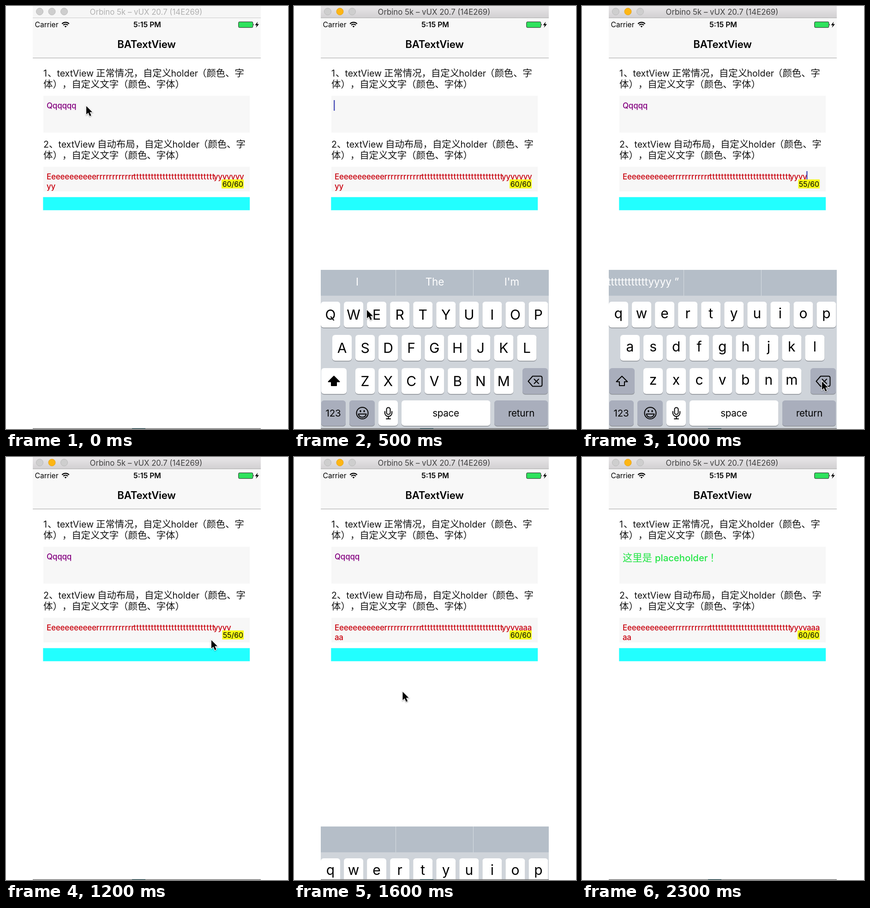
These frames come from a looping animation (611x917 px, 2.4 s). An HTML page:

```html
<!DOCTYPE html>
<html lang="zh-CN">
<head>
<meta charset="utf-8">
<title>BATextView</title>
<style>
  html, body { margin: 0; width: 100%; height: 100%; overflow: hidden; background: #fff; }
  svg { display: block; width: 611px; height: 917px; }
  text { font-family: Inter, "Liberation Sans", sans-serif; white-space: pre; text-spacing-trim: space-all; }
  .mid { text-anchor: middle; }
  .end { text-anchor: end; }
  .cjk { font-family: "Noto Sans CJK SC", "Noto Sans CJK JP", "Noto Sans CJK", sans-serif; font-size: 20.4px; letter-spacing: 0; }
  .label { font-size: 19.5px; fill: #111; }
  .field { font-size: 17px; font-weight: 500; letter-spacing: -.2px; }
  .red { fill: #c8000d; }
  .hint { font-size: 20.3px; font-weight: 500; fill: #22e545; }
  .hint .cjk { font-size: 21.3px; }
  .dot { fill: #cecece; stroke: #bababa; }
  .key { fill: #fff; }
  .fn { fill: #a9aebc; }
  .cap { font-size: 30px; }
  .word { font-size: 20.5px; letter-spacing: -.2px; }
  .sug { font-size: 22.4px; fill: #fff; }
  .line { fill: none; stroke: #000; stroke-width: 2; stroke-linecap: round; stroke-linejoin: round; }
  #pointer { filter: drop-shadow(0 1px 1px #0006); }
</style>
</head>
<body>
<svg viewBox="0 0 611 917">
  <defs>
    <linearGradient id="chrome" x2="0" y2="1">
      <stop stop-color="#e8e6e8"/><stop offset="1" stop-color="#d2d0d2"/>
    </linearGradient>
    <clipPath id="screen"><rect x="58" width="494" height="917"/></clipPath>
  </defs>
  <g clip-path="url(#screen)">
    <rect id="bar" x="58" width="494" height="26"/>
    <rect id="barLine" x="58" y="25" width="494" height="1.5"/>
    <circle class="dot" cx="73" cy="12" r="7.5"/>
    <circle class="dot" id="amber" cx="99.5" cy="12" r="7.5"/>
    <circle class="dot" cx="126" cy="12" r="7.5"/>
    <text id="title" class="mid" x="303.5" y="18.5" font-size="16.8">Orbino 5k – vUX 20.7 (14E269)</text>

    <rect x="58" y="26.5" width="494" height="86" fill="#f8f8f8"/>
    <rect x="58" y="112" width="494" height="1.3" fill="#b4b4b4"/>
    <text x="62.5" y="46" font-size="15.6">Carrier</text>
    <g fill="none" stroke="#000" stroke-width="2.2">
      <path d="M121.3 38.6a11 11 0 0 1 15.4 0M124 41.6a7 7 0 0 1 10 0"/>
      <path d="M126.6 44a3.6 3.6 0 0 1 4.8 0L129 46.4Z" fill="#000" stroke="none"/>
    </g>
    <text class="mid" x="306" y="46" font-size="15.8" font-weight="600">5:15 PM</text>
    <rect x="503.8" y="34.3" width="31" height="12.4" rx="2" fill="#2fe25d" stroke="#222"/>
    <path d="M536 38.5q2 2 0 4Z"/>
    <path d="M545.5 34L539.5 41.5H543.3L541.5 47L548 39.3H544Z"/>
    <text class="mid" x="304.5" y="91" font-size="22.2" font-weight="600" letter-spacing="-.2">BATextView</text>

    <g id="labels"></g>
    <rect x="81" y="194.5" width="447" height="80" fill="#f7f7f7"/>
    <rect x="81" y="348.5" width="447" height="53.5" fill="#f7f7f7"/>
    <rect x="80.5" y="414.5" width="447.5" height="28" fill="#22ffff" stroke="#22ffff" stroke-opacity=".4"/>

    <rect id="mark" x="88" y="204" width="55" height="22.5" fill="#f8c5cb"/>
    <text id="first" class="field" x="88" y="222" fill="#83007f"></text>
    <text id="hint" class="hint" y="225.5"><tspan class="cjk" x="88">这里是</tspan><tspan x="158">placeholder</tspan><tspan class="cjk" x="277">！</tspan></text>
    <g id="second"></g>
    <rect id="caret" width="2.4" height="23" fill="#4b50b8"/>
    <rect id="badge" y="376" height="19.5" fill="#f6fa14"/>
    <text id="count" class="end" x="514" y="391.5" font-size="16" letter-spacing="-.1"></text>

    <g id="popover">
      <path d="M77 133H174q9 0 9 9V172q0 9-9 9H128L115 193L102 181H77q-9 0-9-9V142q0-9 9-9Z" fill="#1e1e1e"/>
      <text class="mid" x="125.5" y="163" font-size="17.8" fill="#fff">Qqqqqq</text>
    </g>

    <g id="board">
      <rect x="58" y="572" width="494" height="345" fill="#cfd4da"/>
      <rect x="58" y="572" width="494" height="56" fill="#b5bec8"/>
      <path d="M220.5 572V628M388.5 572V628" stroke="#d6dbe1"/>
    </g>

    <rect x="58" y="915.5" width="494" height="1.5" fill="#777"/>
    <rect x="273" y="915.5" width="29" height="1.5" fill="#2c4a50"/>
    <path id="pointer" d="M0 0V18L4.2 14.2L7.4 21.6L10.6 20.2L7.4 13H13Z" stroke="#fff" stroke-width="2.2" paint-order="stroke"/>
  </g>
</svg>
<script>
const $ = id => document.getElementById(id);

function add(parent, tag, attrs, text = '') {
  const el = document.createElementNS('http://www.w3.org/2000/svg', tag);
  for (const k in attrs) el.setAttribute(k, attrs[k]);
  el.textContent = text;
  return parent.appendChild(el);
}
const set = (id, attrs) => { for (const k in attrs) $(id).setAttribute(k, attrs[k]); };
const show = (id, on) => { $(id).style.display = on ? '' : 'none'; };

// Field descriptions: mixed Latin and Chinese runs
function label(y, num, lead, dx) {
  const top = add($('labels'), 'text', { class: 'label', y });
  const run = (x, s, cls = '') => add(top, 'tspan', { x, class: cls }, s);
  run(81, num);
  run(90 + dx, '、', 'cjk');
  run(110.5 + dx, 'textView');
  run(195 + dx, lead + '，自定义', 'cjk');
  run(357.5 + dx, 'holder');
  run(414 + dx, '（颜色、字', 'cjk');
  add($('labels'), 'text', { class: 'cjk', x: 81, y: y + 24, fill: '#111' }, '体），自定义文字（颜色、字体）');
}
label(153, '1', '正常情况', 0);
label(307, '2', '自动布局', 3);

// Second field: a fixed start and an editable tail
const redRun = (x, y, gap, s = '') =>
  add($('second'), 'text', { class: 'field red', x, y, style: `letter-spacing:${gap}px` }, s);
const head = ['E', 'e'.repeat(10), 'r'.repeat(12), 't'.repeat(28)];
redRun(88, 376, 0, head[0]);
redRun(98, 376, -.2, head[1]);
redRun(195.5, 376, .1, head[2]);
redRun(276, 376, .6, head[3]);
const tailY = redRun(450, 376, -.45);
const tailA = redRun(487, 376, -.3);
const tailWrap = redRun(88, 397, -.4);

// Keyboard
const board = $('board');
function key(x, y, w, h, cls = 'key') {
  add(board, 'rect', { x, y: y + 1.6, width: w, height: h, rx: 6, fill: '#8d9197' });
  return add(board, 'rect', { x, y, width: w, height: h, rx: 6, class: cls });
}
const letters = [];
[['qwertyuiop', 79, 641], ['asdfghjkl', 104, 713], ['zxcvbnm', 154, 785]].forEach(([row, x, y]) => {
  [...row].forEach((ch, i) => {
    const cx = x + i * 50.05;
    key(cx - 21, y, 42, 56);
    letters.push({ ch, y, el: add(board, 'text', { class: 'cap mid', x: cx }) });
  });
});
const shiftKey = key(59, 785, 55, 56);
key(495, 785, 55, 56, 'fn');
key(59, 855, 53, 55, 'fn');
key(120, 855, 55, 55, 'fn');
key(183, 855, 42, 55);
key(233, 855, 192.5, 55);
key(434, 855, 116, 55, 'fn');
[['123', 85], ['space', 329], ['return', 492.5]].forEach(([s, x]) =>
  add(board, 'text', { class: 'word mid', x, y: 889.5 }, s));

const icon = d => add(board, 'path', { class: 'line', d });
const shiftIcon = icon('M86.5 802.5L98.5 814.5H92V823H81V814.5H74.5Z');
icon('M517 802.5H534q3.5 0 3.5 3.5V821q0 3.5-3.5 3.5H517L507.5 813.5ZM520.5 809L530 818.5M530 809L520.5 818.5');
icon('M135.5 882.5a12.5 12.5 0 1 0 25 0a12.5 12.5 0 1 0-25 0M139.5 884.5H156.5Q155 891.5 148 891.5T139.5 884.5Z');
icon('M144 877.5V879M152 877.5V879').style.strokeWidth = 3;
icon('M200.5 874.5a4 4 0 0 1 8 0V881.5a4 4 0 0 1-8 0ZM196.8 879V882a7.7 7.7 0 0 0 15.4 0V879M204.5 890V895M200 895H209');

const slotX = [137, 305, 472];
const slots = slotX.map(x => add(board, 'text', { class: 'sug mid', x, y: 606 }));

// Each entry changes only what differs from the one before; one entry per 100 ms
const HIDDEN = 345, STARTERS = ['I', 'The', "I'm"];
const changes = [
  { active: false, drop: HIDDEN, upper: false, q: 6, tail: 'yyyyyyyyy', words: [], caret: 0, pop: false, at: [174, 217] },
  { active: true, drop: 0, caret: 1, words: ['“Qqqqqq”'] },
  { at: [520, 814] },
  { q: 3, words: ['“Qqq”'] },
  { q: 0, upper: true, words: STARTERS, at: [440, 775] },
  { at: [158, 659] },
  { q: 2, upper: false, words: ['“Qq”'], at: [78, 668] },
  { q: 5, words: ['“Qqqqq”', 'Qqqqqq'] },
  { caret: 2, words: [], at: [440, 385] },
  { tail: 'yyyyyyy', at: [520, 814], words: ['tail'] },
  { tail: 'yyyy' },
  { drop: 200, caret: 0, words: [], at: [480, 560] },
  { drop: HIDDEN, at: [445, 397] },
  { drop: 0, caret: 2 },
  { tail: 'yyyya', words: ['tail'], at: [104, 740] },
  { tail: 'yyyyaaaaa', words: [] },
  { drop: 229, caret: 0, at: [235.5, 509] },
  { drop: HIDDEN, at: [160, 225] },
  { drop: 0, caret: 1, words: ['“Qqqqq”', 'Qqqqqq'] },
  { caret: 0, pop: true, upper: true, words: ['Qqqqqq'], at: [515, 782] },
  { caret: 1, pop: false, q: 2, upper: false, words: ['“Qq”'], at: [520, 814] },
  { q: 0, upper: true, words: STARTERS },
  { drop: 229, caret: 0, at: null },
  { drop: HIDDEN }
];
let last = {};
const steps = changes.map(c => last = { ...last, ...c });

function draw(s) {
  set('bar', { fill: s.active ? 'url(#chrome)' : '#f6f6f6' });
  set('barLine', { fill: s.active ? '#b2b2b2' : '#d2d2d2' });
  set('title', { fill: s.active ? '#404040' : '#b0b0b0' });
  $('amber').style.cssText = s.active ? 'fill:#fdb615;stroke:#e5a21a' : '';

  $('first').textContent = s.q ? 'Q' + 'q'.repeat(s.q - 1) : '';
  show('hint', !s.q && s.caret !== 1);
  show('mark', s.pop);
  show('popover', s.pop);

  const line = s.tail.slice(0, 7), n = s.tail.length;
  tailY.textContent = line.replace(/a/g, '');
  tailA.textContent = line.replace(/y/g, '');
  tailWrap.textContent = s.tail.slice(7);
  const left = n === 9 ? 467 : 468.5;
  set('badge', { x: left, width: 515 - left });
  $('count').textContent = `${51 + n}/60`;

  show('caret', s.caret);
  if (s.caret === 1) set('caret', { x: s.q ? 101 + 10.6 * (s.q - 1) : 86, y: 204 });
  else set('caret', n > 7 ? { x: 88 + 9.3 * (n - 7), y: 379 } : { x: 449.2 + 9.25 * n, y: 358 });

  show('board', s.drop < HIDDEN);
  set('board', { transform: `translate(0 ${s.drop})` });
  for (const { ch, y, el } of letters) {
    el.textContent = s.upper ? ch.toUpperCase() : ch;
    el.setAttribute('y', y + (s.upper ? 39 : 36));
  }
  shiftKey.setAttribute('class', s.upper ? 'key' : 'fn');
  shiftIcon.style.fill = s.upper ? '#000' : 'none';
  slots.forEach((slot, i) => {
    const long = s.words[i] === 'tail';
    slot.textContent = long ? `“${head.join('')}${s.tail} ”` : s.words[i] || '';
    slot.setAttribute('class', long ? 'sug end' : 'sug mid');
    slot.setAttribute('x', long ? 210 : slotX[i]);
  });

  show('pointer', s.at);
  if (s.at) set('pointer', { transform: `translate(${s.at})` });
}

const start = performance.now();
let shown = -1;
function tick() {
  const i = Math.floor((performance.now() - start) % 2400 / 100);
  if (i !== shown) draw(steps[shown = i]);
  requestAnimationFrame(tick);
}
tick();
</script>
</body>
</html>
```
